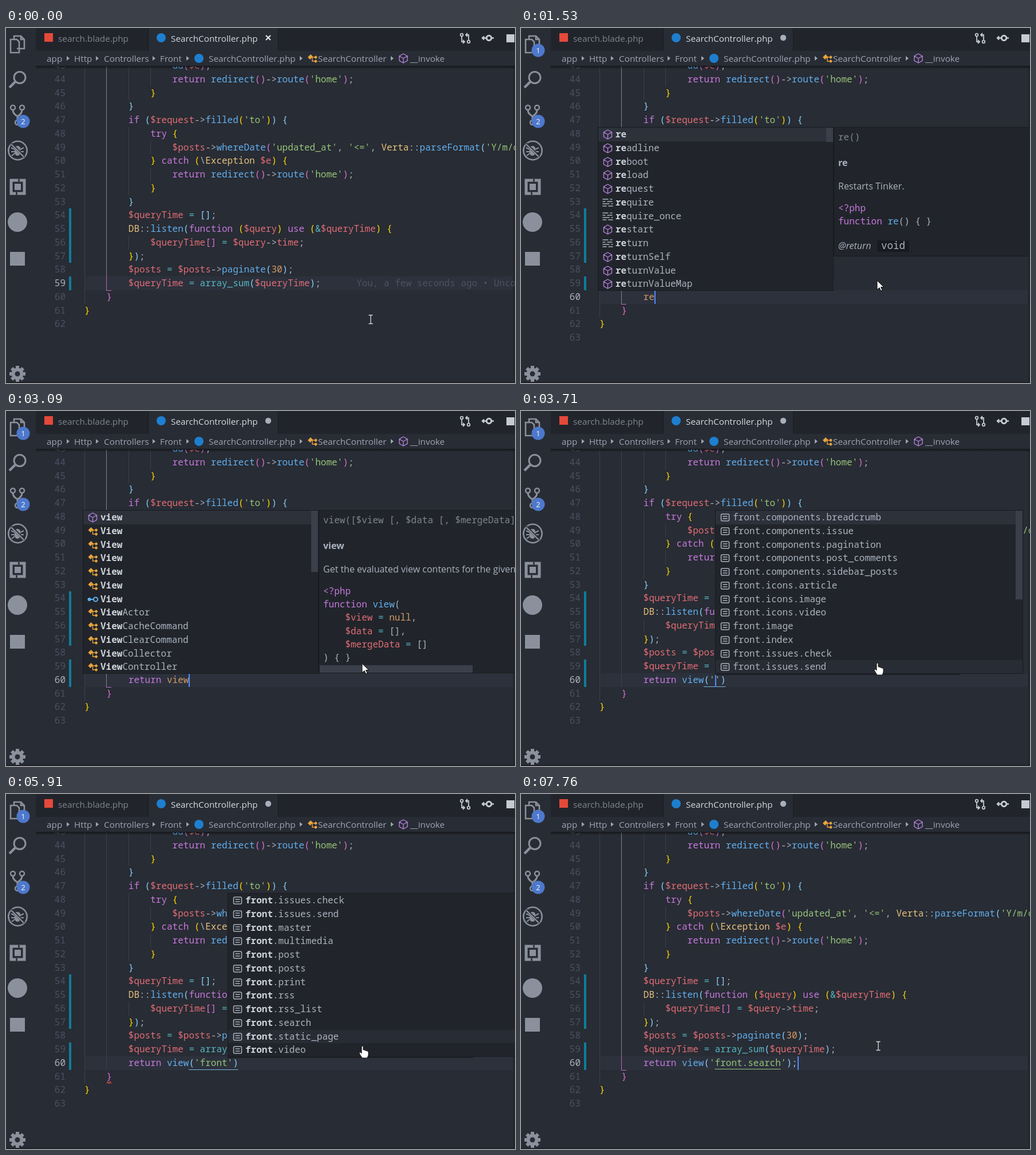
These frames come from a looping animation (889 px wide and 620 px high, 8000 ms). An HTML page with a canvas:

```html
<!DOCTYPE html>
<html lang="en">
<head>
<meta charset="utf-8">
<title>Editor autocomplete</title>
<style>
  html, body { margin: 0; width: 100%; height: 100%; overflow: hidden; background: #282c34; }
  canvas { display: block; }
</style>
</head>
<body>
<canvas id="stage" width="889" height="620"></canvas>
<script>
const ctx = document.getElementById('stage').getContext('2d');
const LOOP = 8000, CHAR = 9.6, ROW = 23.75, LEFT = 137;
const FACE = '16px "Noto Sans Mono", monospace';
const MONO = '500 ' + FACE, BOLD = 'bold ' + FACE;
const UI = '15.3px "Open Sans", sans-serif';
const DOC = '16px "Open Sans", sans-serif';
const C = {
  bg: '#282c34', panel: '#21252b', edge: '#181a1f', line: '#2c313c', select: '#2c313a',
  text: '#abb2bf', dim: '#7f848e', icon: '#8b919c', guide: '#3b4048', thumb: '#3a3f4a',
  red: '#e06c75', green: '#98c379', blue: '#61afef', cyan: '#56b6c2', purple: '#c678dd',
  yellow: '#e5c07b', tan: '#d19a66', caret: '#528bff', cube: '#b180d7', orange: '#e8a33d',
  bar: '#0f7d9b', scope: '#c465bd'
};
const BRACKETS = ['#ffd700', '#da70d6', '#87cefa'];
const KEYWORDS = new Set(['return', 'if', 'try', 'catch', 'function', 'use', '<?php']);

const HEAD = `                dd($e);
                return redirect()->route('home');
            }
        }
        if ($request->filled('to')) {
            try {
                $posts->whereDate('updated_at', '<=', Verta::parseFormat('Y/m/d'));
            } catch (\\Exception $e) {
                return redirect()->route('home');
            }
        }
        $queryTime = [];
        DB::listen(function ($query) use (&$queryTime) {
            $queryTime[] = $query->time;
        });
        $posts = $posts->paginate(30);
        $queryTime = array_sum($queryTime);`.split('\n');
const TAIL = ['    }', '}', ''];

// Completion rows: icon letter, then label.
const rows = s => s.split(' ').map(r => r.split(':'));
const LIST = {
  re: rows('m:re m:readline m:reboot m:reload m:request k:require k:require_once m:restart k:return m:returnSelf m:returnValue m:returnValueMap'),
  ret: rows('k:return m:returnArgument m:returnCallback m:returnSelf m:returnValue m:returnValueMap c:Return_ c:Return_ c:ReturnArgument c:ReturnArgumentPromise c:ReturnByReferenceException c:ReturnCallback'),
  v: rows('m:var_dump m:var_export m:value m:validator m:version_compare m:vfprintf m:view m:virtual m:vprintf m:vsprintf c:Validator c:View'),
  view: rows('m:view c:View c:View c:View c:View c:View i:View c:ViewActor c:ViewCacheCommand c:ViewClearCommand c:ViewCollector c:ViewController'),
  front: ('components.breadcrumb components.issue components.pagination components.post_comments components.sidebar_posts ' +
    'icons.article icons.image icons.video image index issues.check issues.send master multimedia post posts print rss rss_list search static_page video')
    .split(' ').map(n => ['f', 'front.' + n])
};
const DOCS = {
  re: { sig: 're()', name: 're', about: 'Restarts Tinker.', code: ['<?php', 'function re() { }'], h: 226, ret: 'void' },
  v: { sig: 'var_dump($value)', name: 'var_dump', about: 'Dumps information about a variable', code: ['<?php', 'function var_dump($value) { }'], h: 226, ret: 'void' },
  view: {
    sig: 'view([$view [, $data [, $mergeData]]])', name: 'view',
    about: 'Get the evaluated view contents for the given view.',
    code: ['<?php', 'function view(', '    $view = null,', '    $data = [],', '    $mergeData = []', ') { }'], h: 285
  }
};

const wide = 538, docked = { x: 134, w: 412 };
const ibeam = ['ibeam', 624, 440], arrow = ['arrow', 622, 441], hand = ['hand', 625, 450];
const front = (x, match, scroll = 0, hover = 11) => ({ x, w: wide, list: 'front', match, scroll, hover, thumb: 155 });

// Each step changes part of the state left by the step before it.
const STEPS = [
  [0, { text: null, caret: -1, mouse: ['ibeam', 637, 509], note: 612, guide: 'fn', pink: true, close: true }],
  [300, { caret: 43, mouse: ['ibeam', 578, 463] }],
  [610, { mouse: ibeam }],
  [920, { caret: -1 }],
  [1220, { text: '', caret: 8, note: 0, close: false, pink: false }],
  [1530, { text: 're', caret: 10, badge: true, mouse: arrow, doc: 're', menu: { ...docked, list: 're', match: 2, thumb: 25 } }],
  [1850, { text: 'retu', caret: 12, bar: true, mouse: ibeam, doc: null, menu: null }],
  [2160, { pink: true }],
  [2460, { text: 'return', caret: 14, mouse: hand, menu: { x: 272, w: wide - 1, list: 'ret', match: 6, hover: 11, thumb: 107 } }],
  [2780, { text: 'return v', caret: 16, mouse: arrow, doc: 'v', pink: false, menu: { ...docked, list: 'v', match: 1, thumb: 107 } }],
  [3090, { text: 'return view', caret: 19, doc: 'view', menu: { ...docked, list: 'view', match: 4, thumb: 107 } }],
  [3410, { text: "return view('')", caret: 21, mouse: ibeam, doc: null, menu: null }],
  [3710, { guide: 'call', mouse: hand, hint: 339, menu: front(339, 0) }],
  [4020, { text: "return view('fr')", caret: -1, hint: 358, menu: front(358, 2) }],
  [4340, { text: "return view('front')", caret: 26, hint: 377, menu: front(387, 4) }],
  [4650, { hint: 387, menu: front(387, 5, 3) }],
  [4950, { caret: -1 }],
  [5270, { squiggle: true }],
  [5590, { caret: 26, menu: front(387, 5, 10, 10) }],
  [5910, { caret: -1 }],
  [6520, { text: "return view('front.search')", caret: 33, squiggle: false, menu: null, hint: 454, mouse: arrow }],
  [6840, { caret: 35, hint: 0, guide: '', note: 535, mouse: ibeam }],
  [7150, { text: "return view('front.search');", caret: -1, note: 0, guide: 'fn', squiggle: true }],
  [7480, { caret: 36, squiggle: false, pink: true }],
  [7760, { link: true }]
];

const rowTop = n => Math.round(434 + (n - 59) * ROW);
const colX = c => LEFT + c * CHAR;

function box(x, y, w, h, color) {
  ctx.fillStyle = color;
  ctx.fillRect(x, y, w, h);
}
function put(str, x, y, color, font = MONO, align = 'left') {
  ctx.font = font;
  ctx.textAlign = align;
  ctx.fillStyle = color;
  ctx.fillText(str, x, y);
}
function disc(x, y, r, color) {
  ctx.fillStyle = color;
  ctx.beginPath();
  ctx.arc(x, y, r, 0, 7);
  ctx.fill();
}
function ring(x, y, r, color, w) {
  ctx.strokeStyle = color;
  ctx.lineWidth = w;
  ctx.beginPath();
  ctx.arc(x, y, r, 0, 7);
  ctx.stroke();
}
// Strokes (or fills) an SVG path moved to x, y.
function path(d, x, y, color, w = 0, fill) {
  ctx.save();
  ctx.translate(x, y);
  const p = new Path2D(d);
  if (fill) { ctx.fillStyle = fill; ctx.fill(p); }
  if (w) { ctx.strokeStyle = color; ctx.lineWidth = w; ctx.stroke(p); }
  ctx.restore();
}
function frame(x, y, w, h) {
  box(x, y, w, h, C.edge);
  box(x + 1, y + 1, w - 2, h - 2, C.panel);
}

function tokenColor(tok, next, prev) {
  if (tok[0] === "'") return C.green;
  if (tok[0] === '$') return C.red;
  if (KEYWORDS.has(tok)) return C.purple;
  if (tok === 'array_sum') return C.cyan;
  if (/^\d/.test(tok)) return C.tan;
  if (/^[A-Za-z_]/.test(tok)) {
    if (next === '(') return C.blue;
    if (prev === '->') return C.red;
    return /^[A-Z]/.test(tok) ? C.yellow : C.tan;
  }
  return tok === '=' || tok === '&' ? C.cyan : C.text;
}
// Draws one line of code; returns the bracket depth after it (-1 keeps brackets plain).
function code(str, x, y, depth = -1) {
  const toks = str.match(/<\?php|'[^']*'|\$\w+|[A-Za-z_]\w*|\d+|->|::|\s+|./g) || [];
  toks.forEach((tok, i) => {
    let color = tokenColor(tok, toks[i + 1], toks[i - 1]);
    if (depth >= 0 && /^[()[\]{}]$/.test(tok)) {
      const open = '([{'.includes(tok);
      if (!open) depth--;
      color = BRACKETS[depth % 3];
      if (open) depth++;
    }
    if (tok.trim()) put(tok, x, y, color);
    x += tok.length * CHAR;
  });
  return depth;
}

function cube(x, y, s, color) {
  path(`M0 ${-s}L${s * .88} ${-s / 2}V${s / 2}L0 ${s}L${-s * .88} ${s / 2}V${-s / 2}ZM${-s * .88} ${-s / 2}L0 0L${s * .88} ${-s / 2}M0 0V${s}`, x, y, color, 1.4);
}
function classIcon(x, y) {
  path('M-8 -2L-3 -7L1 -3L-4 2ZM3 -2L6 -5L9 -2L6 1ZM3 5L6 2L9 5L6 8Z', x, y, C.orange, 0, C.orange);
  path('M-1 -2H4M0 -2V5H4', x, y, C.orange, 1.4);
}
function rowIcon(kind, x, y) {
  if (kind === 'm') cube(x, y, 8, C.cube);
  if (kind === 'c') classIcon(x, y);
  if (kind === 'k') path('M-9 -6H1M4 -6H8M-9 -2H-4M-1 -2H8M-9 2H3M6 2H9M-9 6H-2M1 6H9', x, y, C.text, 1.7);
  if (kind === 'i') {
    disc(x - 6, y, 3, C.blue);
    path('M-5 0H2', x, y, C.blue, 2);
    ring(x + 5, y, 3.6, C.blue, 2);
  }
  if (kind === 'f') path('M-5 -6H5Q7 -6 7 -4V4Q7 6 5 6H-5Q-7 6 -7 4V-4Q-7 -6 -5 -6ZM-4 -2H4M-4 2H4', x, y, C.text, 1.5);
}

function badge(x, y, n) {
  disc(x, y, 11.5, '#4d78cc');
  put(n, x, y + 5, '#f8fafd', '13px "Open Sans", sans-serif', 'center');
}
function sidebar(s) {
  const g = C.icon;
  path('M-6 -8V-14H6L12 -8V8H-1M6 -14V-8H12M-12 -8H-1L3 -4V15H-12Z', 20, 28, g, 2.6);
  ring(24, 86.5, 10, g, 3);
  path('M-4 4L-14 14', 20, 90, g, 4.5);
  [[12, 139], [28, 139], [20, 165]].forEach(([x, y]) => ring(x, y, 4, g, 2.5));
  path('M-8 -7Q-8 0 0 4Q8 0 8 -7M0 3V11', 20, 150, g, 3);
  ring(20.5, 214, 16.2, g, 2.6);
  path('M-5 -3Q-5 -8 0 -8Q5 -8 5 -3V4Q4 9 0 9Q-4 9 -5 4Z', 20, 214, g, 0, g);
  path('M-11 -5L-5 -2M11 -5L5 -2M-11 2H11M-10 9L-5 5M10 9L5 5', 20, 214, g, 2);
  path('M-11 -12L12 11', 20, 214, C.bg, 4.5);
  path('M-11 -11L11 11', 20, 214, g, 2.4);
  path('M-11.5 -11.5H11.5V11.5H-11.5Z', 20.5, 277.5, g, 5);
  path('M2 -14V-9M-2 9V14', 20.5, 277.5, C.bg, 2.5);
  box(15, 272, 11, 11, g);
  disc(20, 339, 17, g);
  box(7, 391, 26, 24, g);
  for (let i = 0; i < 8; i++) {
    ctx.save();
    ctx.translate(20, 604);
    ctx.rotate(i * Math.PI / 4);
    box(-3, -14, 6, 7, g);
    ctx.restore();
  }
  ring(20, 604, 7.5, g, 6);
  badge(30, 163, '2');
  if (s.badge) badge(30, 39, '1');
}

function header(s) {
  box(52, 0, 837, 40, C.panel);
  box(248, 0, 228, 40, C.bg);
  box(248, 0, 1, 40, C.edge);
  box(475, 0, 1, 40, C.edge);
  box(52, 40, 837, 27, C.bg);
  const shade = ctx.createLinearGradient(0, 66, 0, 72);
  shade.addColorStop(0, 'rgba(0,0,0,.5)');
  shade.addColorStop(1, 'rgba(0,0,0,0)');
  box(52, 66, 837, 6, shade);
  box(67, 9, 15, 15, '#e5493a');
  put('search.blade.php', 91, 24, C.dim, UI);
  disc(271, 17, 8, '#1e7fd0');
  put('SearchController.php', 288, 24, '#d7dae0', UI);
  if (s.close) path('M-4 -4L4 4M4 -4L-4 4', 458, 17, '#e6e8ec', 2.2);
  else disc(458, 17, 5.2, '#a9afba');

  const crumbs = [['app', 71], ['Http', 119], ['Controllers', 171], ['Front', 269],
    ['SearchController.php', 354], ['SearchController', 545], ['__invoke', 706]];
  crumbs.forEach(([t, x]) => put(t, x, 59, '#9da5b4', UI));
  [108, 159, 258, 317, 515, 674].forEach(x => path('M-2 -4L3 0L-2 4Z', x, 53, '', 0, '#9da5b4'));
  disc(337, 53, 8, '#1e7fd0');
  classIcon(535, 53);
  cube(694, 53, 8, C.cube);

  const g = '#c5cad3';
  ring(796, 12, 2.3, g, 1.8);
  ring(808, 24, 2.3, g, 1.8);
  path('M-6 -3V6H-1M-4 3L-1 6L-4 9M6 3V-6H1M4 -9L1 -6L4 -3', 802, 18, g, 1.8);
  ring(843.5, 17.5, 4.2, g, 3);
  path('M-10 0H-4M5 0H10M-7 -3L-10 0L-7 3', 842, 17.5, g, 2.4);
  box(874, 11, 14, 14, g);
}

function editor(s) {
  const typed = s.text !== null;
  const lines = typed ? [...HEAD, '        ' + s.text, ...TAIL] : [...HEAD, ...TAIL];
  const active = typed ? 60 : 59, top = rowTop(active), foot = top + 24;
  box(LEFT, top, 885 - LEFT, 24, C.line);
  box(110, rowTop(54), 4, rowTop(58) - rowTop(54), C.bar);
  box(110, rowTop(59), 4, s.bar ? 48 : 24, C.bar);

  lines.forEach((l, i) => {
    const n = 43 + i;
    const indent = n === 60 && typed ? 8 : l.search(/\S/);
    for (let c = 0; c < indent; c += 4) box(Math.round(colX(c)), rowTop(n), 1, 24, C.guide);
  });
  if (s.guide === 'fn') {
    box(175, 67, 1, top - 67, '#8f7a97');
    box(175, top, 1, 24, s.pink ? C.scope : '#85828c');
    box(175, foot, 9, 1, C.scope);
  }
  let depth = 4;
  lines.forEach((l, i) => {
    const n = 43 + i, y = rowTop(n) + 17;
    put(String(n), 104, y, n === active ? C.text : '#495162', MONO, 'right');
    depth = code(l, LEFT, y, depth);
  });
  if (s.note) put('You, a few seconds ago • Uncommitted changes', s.note, top + 17, '#4b5263');
  if (s.guide === 'call') box(319, 481, (s.text.length - 11) * CHAR, 1, '#79b4dc');
  if (s.link) box(338.4, 480, 12 * CHAR, 1, C.green);
  if (s.squiggle) path('M0 3L2 0L4 3L6 0L8 3', 176, 502.5, '#e04a4a', 1.3);
  if (s.caret >= 0) box(Math.round(colX(s.caret)), top, 2, 24, C.caret);
  box(886, 67, 3, 551, 'rgba(0,0,0,.15)');
}

function hint(x) {
  frame(x, 374, 428, 87);
  put(DOCS.view.sig, x + 9, 397, C.text);
  put('$view', x + 9 + 6 * CHAR, 397, C.blue);
  box(x + 1, 412, 426, 1, '#32363e');
  put(DOCS.view.about, x + 9, 442, C.text, DOC);
}

function menu(m) {
  frame(m.x, 173, m.w, 286);
  const first = m.scroll || 0;
  LIST[m.list].slice(first, first + 12).forEach(([kind, label], i) => {
    const y = Math.round(174 + i * ROW);
    if (first + i === 0) box(m.x + 1, y, m.w - 2, 24, C.select);
    else if (i === m.hover) box(m.x + 1, y, m.w - 2, 23, C.bg);
    rowIcon(kind, m.x + 17.5, y + 12);
    put(label.slice(0, m.match), m.x + 31, y + 17, '#cfd3da', BOLD);
    put(label.slice(m.match), m.x + 31 + m.match * CHAR, y + 17, C.text);
  });
  box(m.x + m.w - 13, 174 + first * 13, 12, m.thumb, C.thumb);
}

function details(d) {
  frame(546, 173, 350, d.h);
  put(d.sig, 554, 196, C.dim);
  put(d.name, 554, 241, C.text, 'bold ' + DOC);
  put(d.about, 554, 282, C.text, DOC);
  d.code.forEach((l, i) => code(l, 554, Math.round(320 + i * 23.2)));
  if (d.ret) {
    put('@return', 554, 386, C.text, 'italic ' + DOC);
    ctx.fillStyle = C.edge;
    ctx.beginPath();
    ctx.roundRect(622, 371, 56, 20, 3);
    ctx.fill();
    put(d.ret, 629, 386, C.text, '17.5px "Noto Sans Mono", monospace');
  } else box(548, 444, 267, 13, C.thumb);
}

function pointer([kind, x, y]) {
  if (kind === 'ibeam') path('M-3.5 -7.5H-1L0 -6.5L1 -7.5H3.5M0 -6.5V6.5M-3.5 7.5H-1L0 6.5L1 7.5H3.5', x, y, '#d8dade', 1.3);
  if (kind === 'arrow') path('M0 0V16L4 12.5L6.5 18L9 17L6.5 11.5H11.5Z', x, y, '#111', 1, '#fff');
  if (kind === 'hand') path('M-4 -9Q-2 -11 -1 -9V-3Q1 -4 2 -2Q4 -3 5 -1Q8 -2 8 1V6L6 11H-3L-8 3Q-8 0 -6 1L-4 3Z', x, y, '#111', 1, '#fff');
}

function draw(t) {
  const s = {};
  for (const [at, change] of STEPS) if (at <= t) Object.assign(s, change);
  box(0, 0, 889, 620, C.bg);
  editor(s);
  header(s);
  sidebar(s);
  box(0, 618, 889, 2, '#1d2026');
  if (s.hint) hint(s.hint);
  if (s.menu) menu(s.menu);
  if (s.doc) details(DOCS[s.doc]);
  pointer(s.mouse);
}

const start = performance.now();
function tick() {
  draw((performance.now() - start) % LOOP);
  requestAnimationFrame(tick);
}
tick();
</script>
</body>
</html>
```
